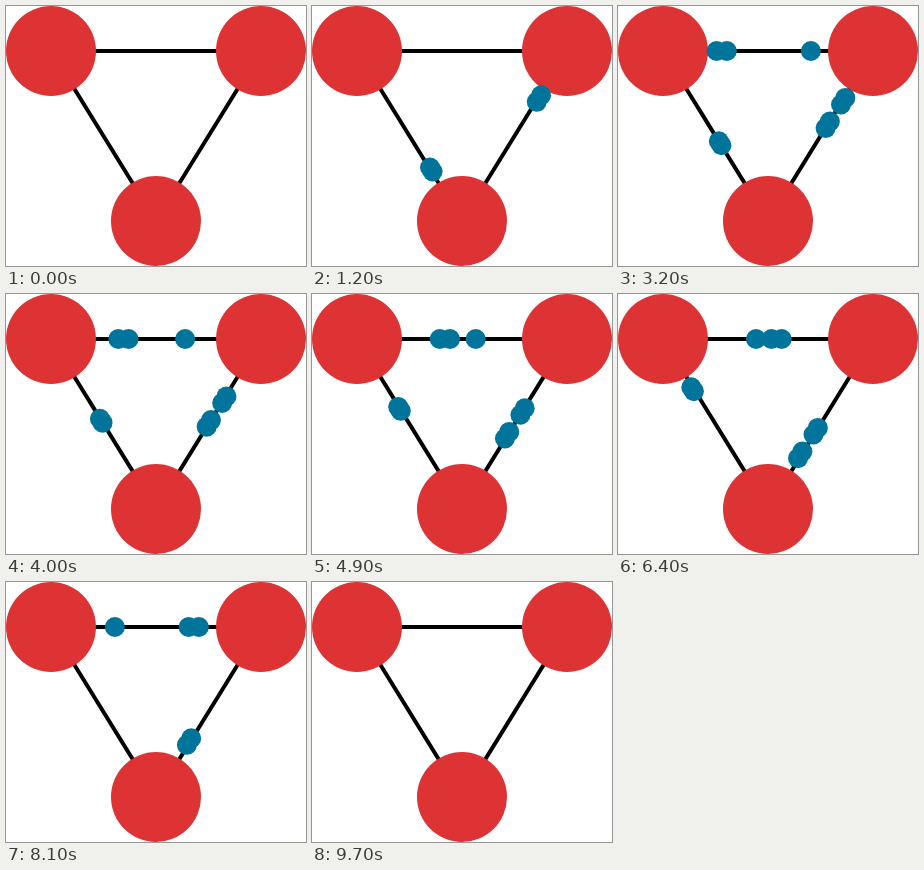
An HTML page for the animation above (10 s loop, 300x260 px).

```html
<!DOCTYPE html>
<html lang="en">
<head>
<meta charset="utf-8">
<title>Network messages</title>
<style>
  html, body { margin: 0; width: 100%; height: 100%; overflow: hidden; background: #fff; }
  svg { display: block; width: 300px; height: 260px; }
</style>
</head>
<body>
<svg viewBox="0 0 300 260">
  <path d="M45 45H255L150 215Z" fill="none" stroke="#000" stroke-width="4"/>
  <g fill="#dd3335">
    <circle cx="45" cy="45" r="45"/>
    <circle cx="255" cy="45" r="45"/>
    <circle cx="150" cy="215" r="45"/>
  </g>
  <g id="dots" fill="#00749a"></g>
</svg>
<script>
const LOOP = 10000, STEP = 100, TRAVEL = 7000;

// Each route: start point, end point, and the departure times of its dots.
const routes = [
  { from: [127.5, 176], to: [67.3, 84], starts: [100, 400] },
  { from: [232.5, 84], to: [172.3, 176], starts: [300, 800, 2100, 2600] },
  { from: [90, 45], to: [210, 45], starts: [2100, 2700] },
  { from: [210, 45], to: [90, 45], starts: [2200] }
];

const layer = document.getElementById('dots');
const dots = routes.flatMap(({ from, to, starts }) => starts.map(start => {
  const el = document.createElementNS('http://www.w3.org/2000/svg', 'circle');
  el.setAttribute('r', 10);
  layer.append(el);
  return { el, from, to, start };
}));

const mix = (a, b, k) => a + (b - a) * k;

function draw(now) {
  const t = Math.floor(now % LOOP / STEP) * STEP;
  for (const { el, from, to, start } of dots) {
    const k = (t - start) / TRAVEL;
    el.setAttribute('visibility', k >= 0 && k < 1 ? 'visible' : 'hidden');
    el.setAttribute('cx', mix(from[0], to[0], k));
    el.setAttribute('cy', mix(from[1], to[1], k));
  }
}

const origin = performance.now();
function tick() {
  draw(performance.now() - origin);
  requestAnimationFrame(tick);
}
tick();
</script>
</body>
</html>
```
